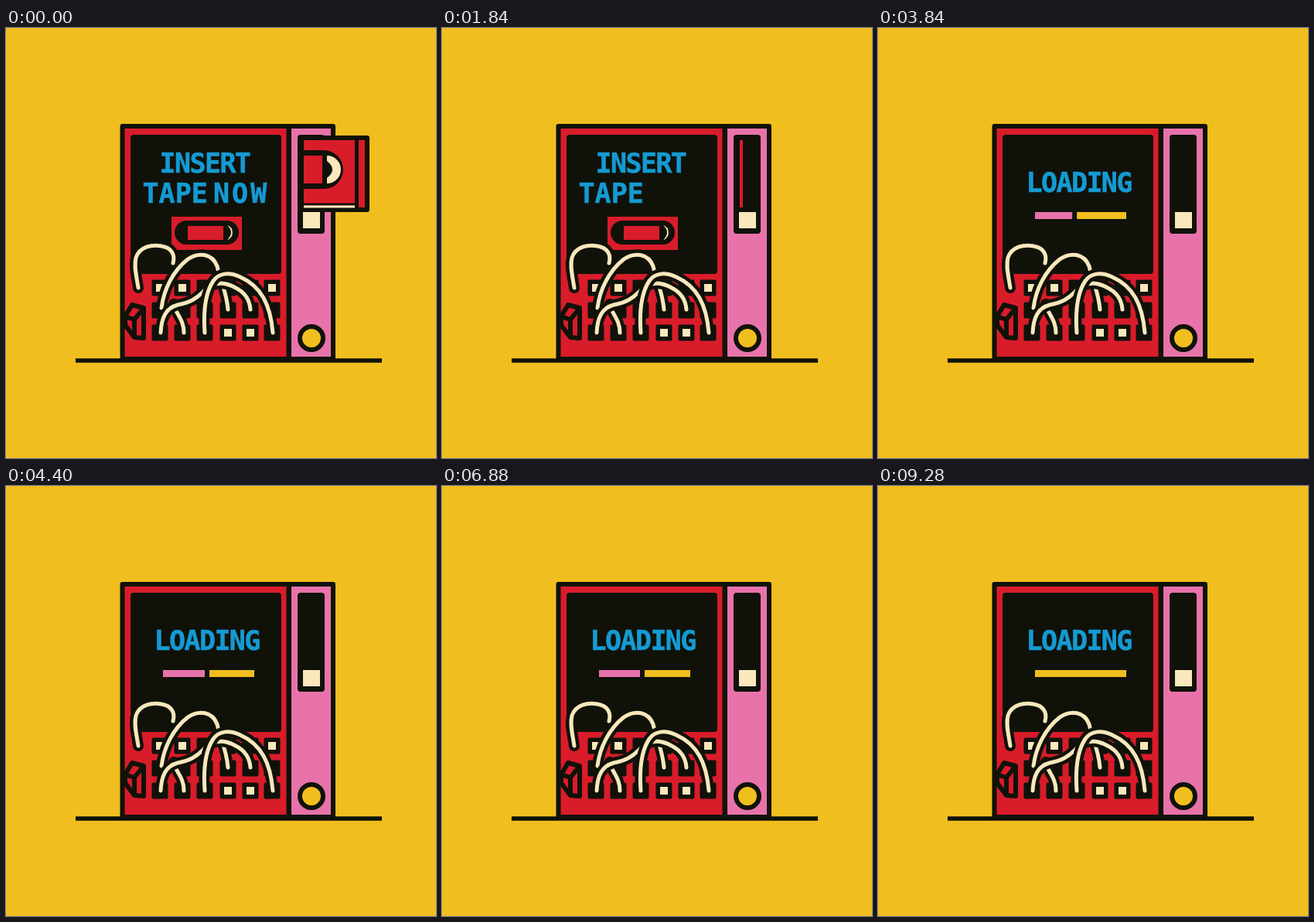
An HTML page that plays this animation: 556 px wide and 556 px high, repeating every 9360 ms.

```html
<!DOCTYPE html>
<html lang="en">
<head>
<meta charset="utf-8">
<title>Insert tape</title>
<style>
  html, body { margin: 0; width: 100%; height: 100%; overflow: hidden; background: #f0be1e; }
  svg { display: block; width: 100%; height: 100%; }
  text { font: bold 35px "DejaVu Sans Mono", monospace; letter-spacing: -1.6px; fill: #149bd3; stroke: #149bd3; stroke-width: .5; }
  .ink { fill: #10120a; }
  .red { fill: #d91c2a; }
  .pink { fill: #e873ab; }
  .cream { fill: #fae8bc; }
  .yellow { fill: #f0be1e; }
  .line { stroke: #10120a; stroke-width: 6; stroke-linejoin: round; }
  .wire { fill: none; stroke-linecap: round; stroke-linejoin: round; }
</style>
</head>
<body>
<svg viewBox="0 0 556 556">
  <defs>
    <clipPath id="slotEdge"><rect x="385" y="130" width="171" height="120"/></clipPath>
  </defs>
  <rect class="yellow" width="556" height="556"/>

  <!-- cabinet -->
  <path d="M90 430H486" stroke="#10120a" stroke-width="5.5"/>
  <rect class="red line" x="150.5" y="127" width="215" height="301"/>
  <rect class="pink line" x="366" y="127" width="57" height="301"/>
  <rect class="ink" x="161" y="138" width="195" height="180" rx="4"/>
  <rect class="ink" x="377" y="138" width="35" height="128" rx="4"/>
  <rect class="cream" x="384" y="238" width="22" height="21"/>
  <circle class="yellow line" cx="395" cy="401" r="15"/>

  <!-- screen -->
  <g id="prompt">
    <text x="198.500" y="187">INSERT</text>
    <text id="tapeWord" x="176.500" y="226" style="letter-spacing:0">TAPE</text>
    <text id="now" x="268" y="226" style="letter-spacing:3px">NOW</text>
    <rect class="red" x="214" y="244" width="91" height="43"/>
    <rect class="ink" x="218" y="249" width="83" height="31" rx="15.5"/>
    <rect class="red" x="235" y="256" width="46" height="18"/>
    <path class="cream" d="M286 255A10 10 0 0 1 286 274Q296 264 286 255z"/>
  </g>
  <g id="loading">
    <text x="191.500" y="211.500">LOADING</text>
    <rect class="pink" id="done" x="203" y="238" height="9"/>
    <rect class="yellow" id="rest" y="238" height="9"/>
  </g>

  <!-- switchboard -->
  <g id="keys"></g>
  <path class="red line" d="M154 373L163 358L178 362V401L166 400L154 384z"/>
  <path class="line" fill="none" d="M154 373L166 377L178 362M166 377V400"/>
  <g id="wires"></g>

  <!-- cassette -->
  <g clip-path="url(#slotEdge)">
    <g id="cassette">
      <rect class="red line" x="330" y="142" width="137" height="93"/>
      <rect class="ink" x="340" y="158" width="96" height="50" rx="25"/>
      <rect class="red" x="350" y="165" width="59" height="36"/>
      <path class="cream" d="M415 165A18 18 0 0 1 415 201V194Q429 183 415 172z"/>
      <path d="M330 228H451" stroke="#10120a" stroke-width="3"/>
      <path d="M330 231H451" stroke="#fae8bc" stroke-width="3"/>
      <path d="M453.500 142V235" stroke="#10120a" stroke-width="5"/>
    </g>
  </g>
</svg>
<script>
const LOOP = 9360, STEP = 80, BAR_LEFT = 203, BAR_RIGHT = 321, GAP = 6;
const LOAD_START = 2000;
const $ = id => document.getElementById(id);

function add(parent, tag, attrs) {
  const node = document.createElementNS("http://www.w3.org/2000/svg", tag);
  for (const name in attrs) node.setAttribute(name, attrs[name]);
  parent.append(node);
}

function square(x, y, size, cls, rx = 0) {
  add($("keys"), "rect", { x: x - size / 2, y: y - size / 2, width: size, height: size, rx, class: cls });
}

const columns = [199, 228, 257, 287, 316, 344];
for (const y of [336, 365, 394])
  for (const x of columns) square(x, y, 21, "ink", 2);
for (const [x, y] of [[199, 336], [228, 336], [344, 336], [287, 394], [316, 394]])
  square(x, y, 10, "cream");

const wires = [
  "M171 336C169 322 165 308 168 297C173 282 189 280 201 282C214 284 219 293 216 304",
  "M217 357C219 370 230 376 230 394",
  "M201 362C204 338 216 314 235 299C250 289 267 292 273 308C277 326 285 340 287 364",
  "M200 394C201 374 207 362 222 358C238 355 246 350 255 341C268 327 283 328 297 336C309 342 315 351 316 364",
  "M257 394C255 366 258 342 268 327C275 317 288 315 303 322C330 334 342 358 345 394"
];
for (const d of wires) {
  add($("wires"), "path", { d, class: "wire", stroke: "#10120a", "stroke-width": 14 });
  add($("wires"), "path", { d, class: "wire", stroke: "#fae8bc", "stroke-width": 5 });
}

// [time, value]
const slide = [[0, 0], [160, -1], [480, -12], [960, -42], [1440, -67], [1840, -75], [2000, -88]];
const progress = [[2000, 0], [2320, 13], [2880, 32], [3440, 44], [4400, 54], [5600, 56],
  [6880, 53], [8320, 47], [8800, 36], [9280, 0]];

function valueAt(keys, t) {
  const next = keys.findIndex(key => key[0] >= t);
  if (next < 0) return keys[keys.length - 1][1];
  if (next === 0) return keys[0][1];
  const [t0, v0] = keys[next - 1], [t1, v1] = keys[next];
  return v0 + (v1 - v0) * (t - t0) / (t1 - t0);
}

function show(id, visible) {
  $(id).style.display = visible ? "" : "none";
}

function draw(t) {
  const loading = t >= LOAD_START;
  show("prompt", !loading);
  show("loading", loading);
  show("tapeWord", t < 960 || t >= 1440);
  show("now", t < 960);

  show("cassette", !loading);
  $("cassette").setAttribute("transform", `translate(${valueAt(slide, t)} 0)`);

  const done = valueAt(progress, t);
  const restLeft = BAR_LEFT + done + Math.min(GAP, done);
  $("done").setAttribute("width", done);
  $("rest").setAttribute("x", restLeft);
  $("rest").setAttribute("width", BAR_RIGHT - restLeft);
}

const start = performance.now();
function tick() {
  const elapsed = (performance.now() - start) % LOOP;
  draw(Math.floor(elapsed / STEP) * STEP);
  requestAnimationFrame(tick);
}
tick();
</script>
</body>
</html>
```
